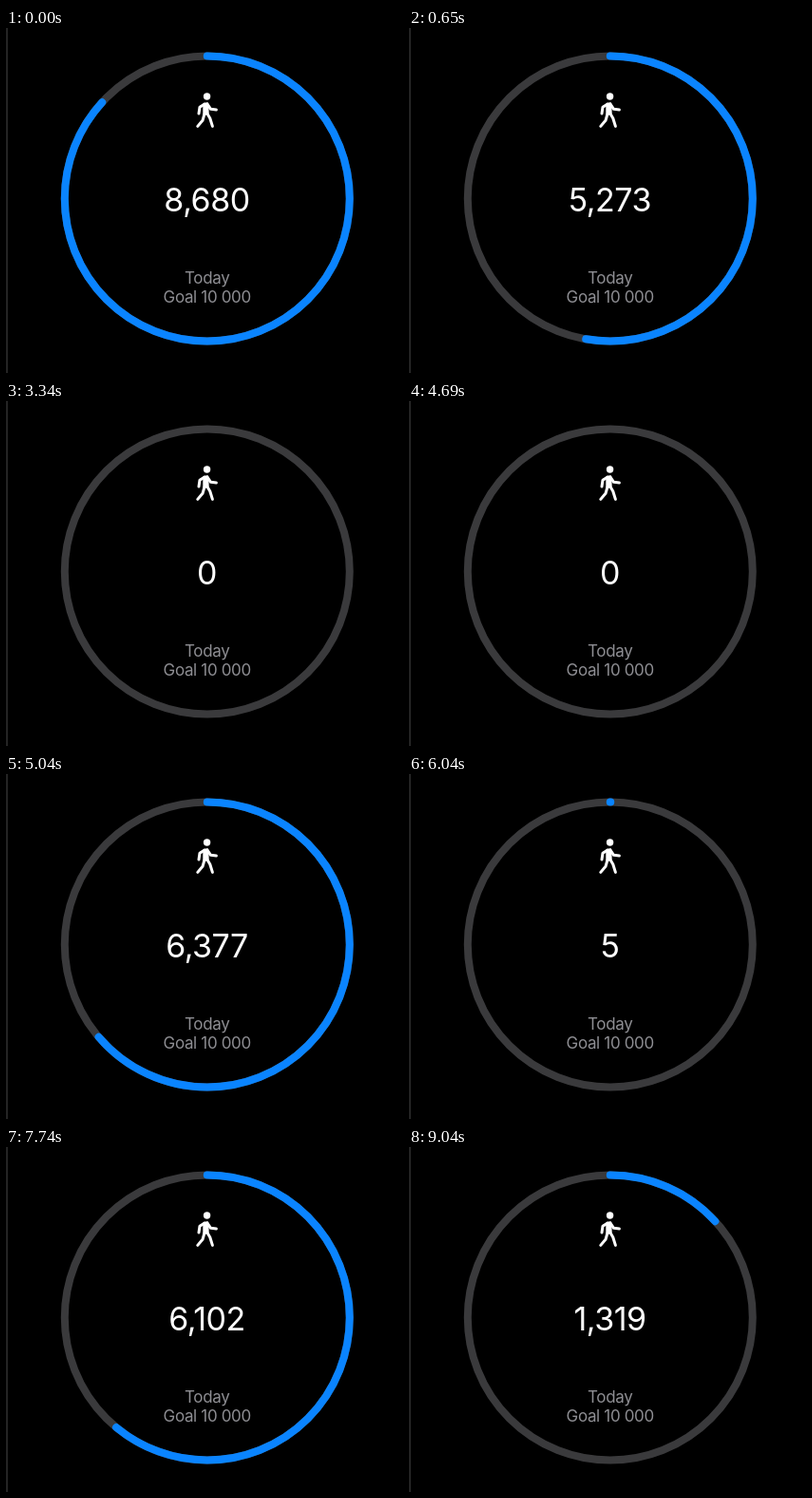
Animation of 418 by 363 pixels, one loop 9.24 s. Source, as an HTML page:

```html
<!DOCTYPE html>
<html lang="en">
<head>
<meta charset="utf-8">
<title>Step counter</title>
<style>
  html, body { margin: 0; width: 100%; height: 100%; overflow: hidden; background: #000; }
  svg { display: block; width: 418px; height: 363px; }
  text { font-family: Inter, Roboto, sans-serif; text-anchor: middle; }
  .ring { fill: none; stroke-width: 8; }
  .label { font-size: 17px; letter-spacing: -.35px; fill: #8e8e93; }
  #count { font-size: 34px; letter-spacing: -.5px; fill: #fff; }
</style>
</head>
<body>
<svg viewBox="0 0 418 363">
  <rect width="2" height="363" fill="#242424"/>
  <circle class="ring" cx="211.8" cy="179.5" r="150" stroke="#3a3a3c"/>
  <circle class="ring" id="arc" cx="211.8" cy="179.5" r="150" stroke="#0a84ff"
    stroke-linecap="round" pathLength="10000" transform="rotate(-90 211.8 179.5)"/>
  <g fill="none" stroke="#fff" stroke-width="3" stroke-linecap="round" stroke-linejoin="round">
    <circle cx="211.6" cy="72" r="3.7" fill="#fff" stroke="none"/>
    <path d="M208.8 80.2 L211.8 79.8 L212.2 89.2 L208.8 90.8 Z" fill="#fff"/>
    <path d="M208.8 80.2 L204 83.2 L203 90"/>
    <path d="M212 80.2 L215.6 85.3 L221.4 86"/>
    <path d="M208.8 91 L207 97.3 L201.8 103.4"/>
    <path d="M211.6 89.5 L214.8 95 L217.4 103.4"/>
  </g>
  <text id="count" x="211.5" y="192.5"></text>
  <text class="label" x="211.7" y="269">Today</text>
  <text class="label" x="211.7" y="289.3">Goal 10 000</text>
</svg>
<script>
const LOOP = 9240, RUN = 350, TICK = 50;
// reset time, delay before the count starts, steps reached
const runs = [
  [-1000, 0, 8680],
  [350, 25, 5821],
  [1850, 0, 5441],
  [3340, 0, 3240],
  [4690, 25, 6441],
  [6040, -10, 3100],
  [7390, 0, 6102],
  [8690, 0, 1319]
];
const arc = document.getElementById('arc');
const count = document.getElementById('count');

const bezier = (a, b, u) => 3 * a * u * (1 - u) ** 2 + 3 * b * u * u * (1 - u) + u ** 3;

function easeInOut(x) {
  if (x <= 0) return 0;
  if (x >= 1) return 1;
  let lo = 0, hi = 1;
  for (let i = 0; i < 24; i++) {
    const mid = (lo + hi) / 2;
    if (bezier(.42, .58, mid) < x) lo = mid; else hi = mid;
  }
  return bezier(0, 1, lo);
}

function stepsAt(t) {
  const [start, delay, goal] = runs.findLast(run => run[0] <= t);
  const elapsed = Math.floor((t - start) / TICK) * TICK;
  return Math.round(goal * easeInOut((elapsed - delay) / RUN));
}

const begin = performance.now();
function draw() {
  const steps = stepsAt(Math.max(0, performance.now() - begin) % LOOP);
  count.textContent = steps.toLocaleString('en-US');
  arc.setAttribute('stroke-dasharray', steps + ' 20000');
  arc.setAttribute('visibility', steps ? 'visible' : 'hidden');
  requestAnimationFrame(draw);
}
draw();
</script>
</body>
</html>
```
